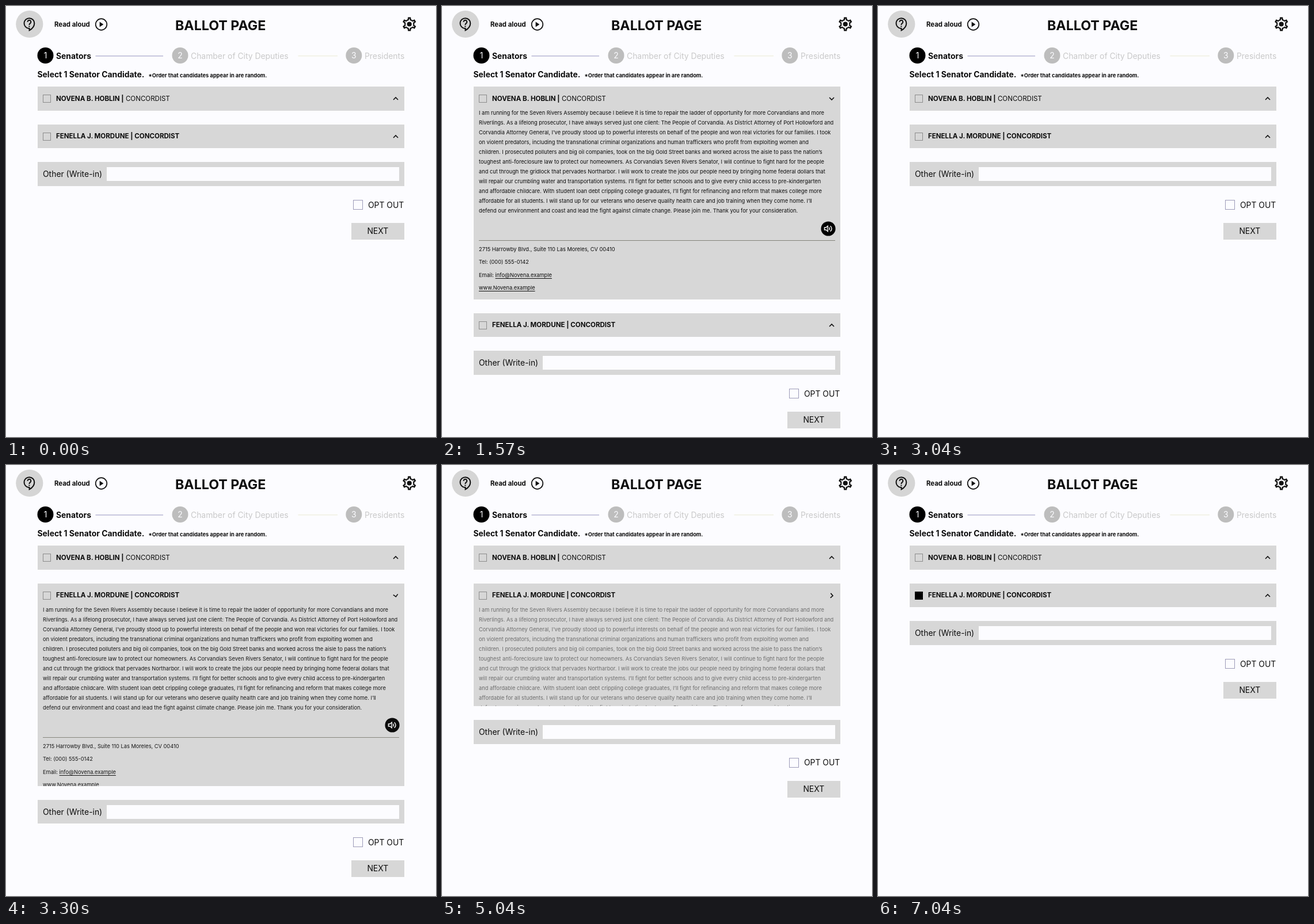
Write an HTML page that moves like this. It is 747 px wide and 749 px high and loops after 7070 ms.

```html
<!DOCTYPE html>
<html lang="en">
<head>
<meta charset="utf-8">
<title>Ballot page</title>
<style>
@property --first { syntax: "<number>"; inherits: true; initial-value: 0; }
@property --second { syntax: "<number>"; inherits: true; initial-value: 0; }

html, body { margin: 0; width: 100%; height: 100%; overflow: hidden; background: #fcfcff; }
.stage {
  position: relative; width: 747px; height: 749px; overflow: hidden;
  font: 13.9px/20px Inter, sans-serif; color: #0c0c0c; white-space: nowrap;
  animation: first 7070ms ease-in-out infinite, second 7070ms ease-in-out infinite;
}
/* each toggle takes 300 ms */
@keyframes first {
  0%, 5.375% { --first: 0; }
  9.618%, 32.263% { --first: 1; }
  36.506%, 100% { --first: 0; }
}
@keyframes second {
  0%, 43.14% { --second: 0; }
  47.383%, 69.236% { --second: 1; }
  73.479%, 100% { --second: 0; }
}
@keyframes check {
  0% { background: none; border-color: #8c8c8c; }
  83.52%, 100% { background: #000; border-color: #000; }
}

.at { position: absolute; left: var(--x); top: var(--y); }
.bold { font-weight: 700; }
.dim { color: #c9c9c9; }
.head { position: absolute; inset: 0; }
.list { position: absolute; left: 54.5px; top: 140px; width: 637.5px; }
.panel, .other {
  position: relative; height: 41.7px; margin-bottom: 24px;
  background: #d7d7d7; overflow: hidden;
}
.panel { height: calc(41.7px + 328px * var(--open)); }
.box { position: absolute; left: 9.5px; top: 14px; width: 12px; height: 12px; border: 1px solid #8c8c8c; }
.pick { animation: check 7070ms step-end infinite; }
.name { position: absolute; left: 32.5px; top: 10.5px; font-size: 11.55px; }
.arrow {
  position: absolute; left: 615px; top: 14px; width: 14px; height: 14px;
  transform: rotate(calc(180deg * var(--open)));
}
.arrow path { fill: none; stroke: #111; stroke-width: 1.6; }
.details { position: absolute; inset: 0; opacity: var(--open); }
.speech, .contact { position: absolute; left: 9.5px; font-size: 9.25px; white-space: pre; }
.speech { top: 37.3px; line-height: 17px; }
.contact {
  top: 267px; width: 619px; padding-top: 4px;
  border-top: 1px solid #83837a; line-height: 22.4px;
}
.speaker { position: absolute; left: 603px; top: 233.5px; width: 26px; height: 26px; }
u { text-underline-offset: 1.5px; text-decoration-thickness: 1px; }
.field { position: absolute; left: 120.5px; top: 9px; width: 508px; height: 24px; background: #fcfcff; }
.tail { position: relative; height: 94px; }
.opt { position: absolute; left: 548.5px; top: 0; width: 15px; height: 15px; border: 1px solid #9d9bb8; }
.next {
  position: absolute; left: 545px; top: 40px; width: 92.5px; height: 29px;
  background: #d7d7d7; text-align: center; line-height: 29px;
}
</style>
</head>
<body>
<div class="stage">
  <svg class="head" width="747" height="749" viewBox="0 0 747 749" fill="none" stroke="#111">
    <circle cx="40.8" cy="31.5" r="23.6" fill="#d5d5d5" stroke="none"/>
    <g stroke-width="2">
      <path d="M39.6 38.9A8.9 8.9 0 1 1 49.3 30C49.3 35.5 45 40 40.6 42.4V38.9Z"/>
      <path d="M37.5 27.7a2.9 2.9 0 1 1 4.7 2.2c-1.3 1-1.8 1.5-1.8 3M40.4 34.4v2"/>
    </g>
    <circle cx="165.5" cy="32" r="9.8" stroke-width="1.7"/>
    <path d="M162.6 27.6L169.4 32L162.6 36.4Z" fill="#111" stroke="none"/>
    <g transform="translate(700.7 31.5) scale(1.2)" stroke-width="2">
      <path id="tooth" d="M-3.1-5.4L-1.6-6.4L-1.2-9H1.2L1.6-6.4L3.1-5.4"/>
      <use href="#tooth" transform="rotate(60)"/>
      <use href="#tooth" transform="rotate(120)"/>
      <use href="#tooth" transform="rotate(180)"/>
      <use href="#tooth" transform="rotate(240)"/>
      <use href="#tooth" transform="rotate(300)"/>
      <circle r="3.4" fill="#111" stroke="none"/>
    </g>
    <path d="M155.5 86.8H273" stroke="#aaa8cb" stroke-width="1.3"/>
    <path d="M507.5 86.8H576" stroke="#e9e9d2"/>
    <g stroke="none">
      <circle cx="68.5" cy="86" r="14" fill="#000"/>
      <circle cx="302.5" cy="86" r="14" fill="#bdbdbd"/>
      <circle cx="604.3" cy="86" r="14" fill="#bdbdbd"/>
      <g fill="#fcfcff" text-anchor="middle" font-size="13.9">
        <text x="68.5" y="91">1</text>
        <text x="302.5" y="91">2</text>
        <text x="604.3" y="91">3</text>
      </g>
    </g>
  </svg>

  <div class="at bold" style="--x:84px;--y:22px;font-size:11.4px">Read aloud</div>
  <div class="at bold" style="--x:294px;--y:24px;font-size:23.2px">BALLOT PAGE</div>
  <div class="at bold" style="--x:87px;--y:77px">Senators</div>
  <div class="at dim" style="--x:321px;--y:77px">Chamber of City Deputies</div>
  <div class="at dim" style="--x:623px;--y:77px">Presidents</div>
  <div class="at bold" style="--x:54.5px;--y:109px">Select 1 Senator Candidate.</div>
  <div class="at bold" style="--x:247.5px;--y:111px;font-size:9.27px">*Order that candidates appear in are random.</div>

  <div class="list">
    <div class="panel" style="--open:var(--first)">
      <div class="box"></div>
      <div class="name"><b>NOVENA B. HOBLIN |</b> CONCORDIST</div>
      <svg class="arrow" viewBox="-7 -7 14 14"><path d="M-4 2L0-2L4 2"/></svg>
      <div class="details">
        <div class="speech">I am running for the Seven Rivers Assembly because I believe it is time to repair the ladder of opportunity for more Corvandians and more
Riverlings. As a lifelong prosecutor, I have always served just one client: The People of Corvandia. As District Attorney of Port Hollowford and
Corvandia Attorney General, I’ve proudly stood up to powerful interests on behalf of the people and won real victories for our families. I took
on violent predators, including the transnational criminal organizations and human traffickers who profit from exploiting women and
children. I prosecuted polluters and big oil companies, took on the big Gold Street banks and worked across the aisle to pass the nation’s
toughest anti-foreclosure law to protect our homeowners. As Corvandia’s Seven Rivers Senator, I will continue to fight hard for the people
and cut through the gridlock that pervades Northarbor. I will work to create the jobs our people need by bringing home federal dollars that
will repair our crumbling water and transportation systems. I’ll fight for better schools and to give every child access to pre-kindergarten
and affordable childcare. With student loan debt crippling college graduates, I’ll fight for refinancing and reform that makes college more
affordable for all students. I will stand up for our veterans who deserve quality health care and job training when they come home. I’ll
defend our environment and coast and lead the fight against climate change. Please join me. Thank you for your consideration.</div>
        <svg class="speaker" viewBox="-13 -13 26 26" fill="none" stroke="#fff" stroke-width="1.4">
          <circle r="12.6" fill="#000" stroke="none"/>
          <path d="M-6.6-2H-4L-.8-4.8V4.8L-4 2H-6.6ZM1.6-2.4Q3.4 0 1.6 2.4M3.6-4.8Q8.4 0 3.6 4.8"/>
        </svg>
        <div class="contact">2715 Harrowby Blvd., Suite 110 Las Moreles, CV 00410
Tel: (000) 555-0142
Email: <u>info@Novena.example</u>
<u>www.Novena.example</u></div>
      </div>
    </div>
    <div class="panel" style="--open:var(--second)">
      <div class="box pick"></div>
      <div class="name bold">FENELLA J. MORDUNE | CONCORDIST</div>
      <svg class="arrow" viewBox="-7 -7 14 14"><path d="M-4 2L0-2L4 2"/></svg>
    </div>
    <div class="other">
      <div class="at" style="--x:9.5px;--y:11px">Other (Write-in)</div>
      <div class="field"></div>
    </div>
    <div class="tail">
      <div class="opt"></div>
      <div class="at" style="--x:574.5px;--y:-1.5px">OPT OUT</div>
      <div class="next">NEXT</div>
    </div>
  </div>
</div>
<script>
// both panels share the same statement
const details = document.querySelector(".details");
document.querySelectorAll(".panel")[1].append(details.cloneNode(true));
</script>
</body>
</html>
```
